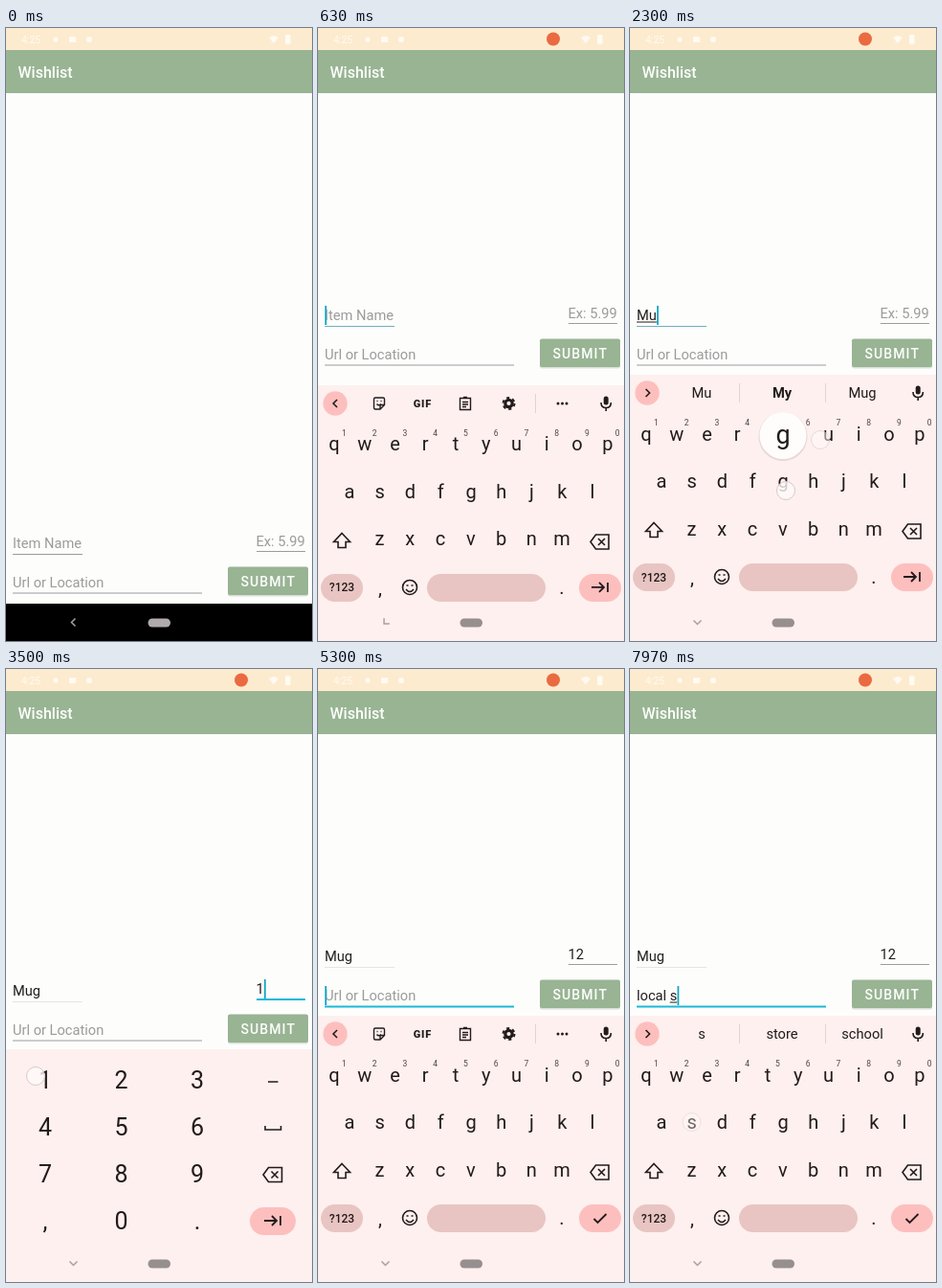
Recreate the animation shown at these times as an HTML page. Size 320 px wide and 640 px high, loop 8 s.

```html
<!DOCTYPE html>
<html lang="en">
<head>
<meta charset="utf-8">
<title>Wishlist</title>
<style>
  html, body { margin: 0; width: 100%; height: 100%; overflow: hidden; background: #fdfdfc; }
  svg { display: block; width: 320px; height: 640px; font-family: Roboto, sans-serif; stroke-width: 1.6; }
  .ink { fill: #221b1b; }
  .line { fill: none; stroke: #221b1b; }
  .mid { text-anchor: middle; }
  .field { font-size: 14.65px; }
  .key { font-size: 20px; }
  .digit { font-size: 25px; }
  .hint { font-size: 8.5px; fill: #4e4444; }
  .word { font-size: 14.7px; }
  .board { fill: #fdf0ee; }
  .sage { fill: #98b493; }
  .pink { fill: #fdbfbe; }
  .tan { fill: #e8c5c2; }
  .rule { stroke: #e3d3d0; stroke-width: 1; }
</style>
</head>
<body>
<svg viewBox="0 0 320 640">
  <rect width="320" height="640" fill="#fdfdfc"/>
  <rect width="320" height="23" fill="#fdebcf"/>
  <g fill="#fffaf2">
    <text x="16" y="16" font-size="10.5">4:25</text>
    <circle cx="52" cy="12" r="2.5"/>
    <rect x="66" y="9" width="7" height="6" rx="1"/>
    <circle cx="87" cy="12" r="3"/>
    <path d="M275 10q5-4 10 0l-5 6z"/>
    <rect x="292" y="7" width="5.5" height="10" rx="1"/>
  </g>
  <circle id="rec" cx="246" cy="11.5" r="7" fill="#ea6a41"/>
  <rect y="23" width="320" height="45" class="sage"/>
  <text x="12.5" y="52" font-size="16" font-weight="500" fill="#fdfdfc">Wishlist</text>

  <g id="form">
    <g class="field">
      <text id="itemText" x="7" y="305"/>
      <text id="priceText" x="261.5" y="303"/>
      <text id="urlText" x="7" y="346"/>
    </g>
    <rect id="itemRule" x="7" y="311" width="73"/>
    <rect id="priceRule" x="262" y="308" width="51"/>
    <rect id="urlRule" x="7" y="351.500" width="198"/>
    <rect id="comp" height="1" class="ink"/>
    <rect id="caret" width="1.8" height="20" fill="#15a9c4"/>
    <rect x="232" y="325.5" width="84" height="30" rx="2" fill="#dcdfda"/>
    <rect x="232" y="324.5" width="84" height="29.5" rx="2" class="sage"/>
    <text x="245.5" y="345" font-size="14" font-weight="500" letter-spacing="1.1" fill="#fdfdfc">SUBMIT</text>
  </g>

  <g id="abc">
    <rect y="362" width="320" height="278" class="board"/>
    <circle cx="18" cy="381" r="12.7" class="pink"/>
    <path id="chevron" class="line"/>
    <g id="tools">
      <path class="line" stroke-width="1.4" d="M60 375h8q1.500 0 1.500 1.500v6l-4.500 4.500h-5q-1.500 0-1.500-1.500v-9q0-1.500 1.500-1.500zM69.500 382.500h-3.500q-1 0-1 1v3.500M61.500 381.500q2 2.500 4.500 0M61.500 378.500h1M65.500 378.500h1"/>
      <text x="109.5" y="385" class="mid ink" font-size="11" font-weight="900" letter-spacing=".9">GIF</text>
      <path class="line" stroke-width="1.4" d="M148.500 375.500h11v12h-11zM151 379.500h6M151 382h6M151 384.500h4M152 374.500h4"/>
      <circle cx="199.500" cy="381" r="3.700" class="line" stroke-width="3.200"/>
      <circle cx="199.500" cy="381" r="6" class="line" stroke-width="2" stroke-dasharray="3.140"/>
      <path class="rule" d="M227.500 371v20"/>
      <g class="ink"><circle cx="251" cy="381" r="1.500"/><circle cx="255.500" cy="381" r="1.500"/><circle cx="260" cy="381" r="1.500"/></g>
    </g>
    <g id="words" class="word mid ink">
      <path class="rule" d="M114.500 371v20M204.500 371v20"/>
      <text x="75" y="386"/><text x="159" y="386"/><text x="243" y="386"/>
      <g id="emoji">
        <path class="rule" d="M243.500 371v20"/>
        <path fill="#e8607c" d="M222 389c-11-4-7-14-1-9 4-7 12 0 1 9z"/>
        <path fill="#f0889a" d="M229 382c-8-3-5-10-1-6 4-5 9 1 1 6z"/>
        <circle cx="263.500" cy="381" r="8" fill="#f7c04a"/>
        <path class="line" stroke-width="1.200" d="M259 379q1.500-2 3 0M266 378.500h2M263 382q3 1 0 2 3 1 0 2"/>
        <path fill="#e5413f" d="M269 389c-6-3-3-7 0-4 3-3 6 1 0 4z"/>
      </g>
    </g>
    <rect x="298.700" y="373.500" width="5" height="9" rx="2.500" class="ink"/>
    <path class="line" d="M296 380q0 5.500 5.200 5.500t5.200-5.500M301.200 385.500v3.500"/>
    <g id="keys"></g>
    <path class="line" d="M25 516.500l8.500 9h-4.500v6h-8v-6h-4.500z"/>
    <path class="line" d="M285 525.500l5.500-7.500h13.500v15h-13.500zM293 522l7 7m0-7l-7 7"/>
    <rect x="3" y="559" width="44" height="29" rx="14.500" class="tan"/>
    <text x="25" y="577.500" class="mid ink" font-size="12" font-weight="500">?123</text>
    <text x="65" y="581" class="mid ink key">,</text>
    <circle cx="96" cy="573" r="7.500" class="line"/>
    <path class="line" d="M92 575q4 5 8 0M92.500 571h2M97.500 571h2"/>
    <rect x="114" y="559" width="124" height="29" rx="14.500" class="tan"/>
    <text x="255" y="580" class="mid ink key">.</text>
    <rect x="273" y="559" width="44" height="29" rx="14.500" class="pink"/>
    <path id="enter" class="line" stroke-width="1.800"/>
  </g>

  <g id="num">
    <rect y="397" width="320" height="243" class="board"/>
    <g id="digits"></g>
    <path class="line" d="M274 431h10.500M271 477v4h16.500v-4"/>
    <path class="line" d="M269 528l5.500-7.500h14v15h-14zM277.500 524.500l7 7m0-7l-7 7"/>
    <rect x="255" y="562" width="48" height="29" rx="14.500" class="pink"/>
    <path class="line" stroke-width="1.800" d="M270 576h13m-5-5l5 5-5 5M287 571v10"/>
  </g>

  <rect id="nav" y="601" width="320" height="39"/>
  <rect id="pill" x="148.500" y="616.500" width="23.500" height="9" rx="4.500"/>
  <path id="back" fill="none" stroke="#a89f9f" stroke-width="1.500" d="M2-4l-4 4 4 4"/>

  <g id="dots" stroke-width="1"></g>
  <g id="popup">
    <circle r="25.500" cy="1" fill="#e6d8d6"/>
    <circle r="24.500" fill="#fffdfc"/>
    <text y="8" class="mid ink" font-size="27"></text>
  </g>
</svg>
<script>
const LOOP = 8000, SHOWN = 530;
const $ = id => document.getElementById(id);
const set = (el, attrs) => { for (const k in attrs) el.setAttribute(k, attrs[k]); };
const show = (el, on) => { el.style.display = on ? '' : 'none'; };
const clamp = v => Math.min(1, Math.max(0, v));

// Key layout: letters, first x, centre y
const PITCH = 31.75;
const rows = [['qwertyuiop', 17, 424], ['asdfghjkl', 33, 473.5], ['zxcvbnm', 64.5, 523]];
const pos = {};
let html = '';
rows.forEach(([letters, x0, y], r) => [...letters].forEach((ch, i) => {
  const x = x0 + i * PITCH;
  pos[ch] = [x, y];
  html += `<text class="mid ink key letter" x="${x}" y="${y + 6.5}">${ch}</text>`;
  if (!r) html += `<text class="mid hint" x="${x + 10.5}" y="${y - 9}">${(i + 1) % 10}</text>`;
}));
$('keys').innerHTML = html;
$('digits').innerHTML = ['123', '456', '789', ',0.'].map((row, r) => [...row].map((ch, c) =>
  `<text class="mid ink digit" x="${41 + c * 79.5}" y="${438 + r * 49}">${ch}</text>`).join('')).join('');
const letters = [...document.querySelectorAll('.letter')];
const words = [...document.querySelectorAll('#words text')];

const fields = {
  item: { x: 7, y: 305, hint: 'Item Name' },
  price: { x: 261.5, y: 303, hint: 'Ex: 5.99' },
  url: { x: 7, y: 346, hint: 'Url or Location' }
};

// Taps: time, x, y, letter shown in the popup
const taps = [
  [260, 40, 538], [1150, 25, 524], [1640, 254, 526, 'm'], [2110, 199, 430, 'u'],
  [2270, 163, 483, 'g'], [2850, 294, 574], [3390, 31, 425], [3760, 118, 431],
  [4100, 278, 577], [6000, 286, 475, 'l'], [6210, 270, 427, 'o'], [6410, 127, 524, 'c'],
  [6800, 33, 475, 'a'], [7100, 287, 474, 'l'], [7450, 176, 564], [7750, 64.5, 473, 's']
];
$('dots').innerHTML = taps.map(([, x, y]) =>
  `<circle cx="${x}" cy="${y}" r="9.5" fill="#fffafa" fill-opacity=".8" stroke="#d8caca"/>`).join('');
const dots = [...$('dots').children];

// State changes; comp is where the underlined word begins, * marks bold
const steps = [
  [0, { item: '', price: '', url: '', comp: -1, words: null, focus: '', upper: false, pad: 'none', check: false }],
  [360, { focus: 'item' }],
  [SHOWN, { pad: 'abc' }],
  [1250, { upper: true }],
  [1740, { item: 'M', comp: 0, upper: false, words: ['M', '*My', 'Me'] }],
  [2210, { item: 'Mu', words: ['Mu', '*My', 'Mug'] }],
  [2370, { item: 'Mug', words: ['Mug', '*Mugs', 'Must'] }],
  [2960, { focus: 'price', comp: -1, pad: 'num' }],
  [3490, { price: '1' }],
  [3860, { price: '12' }],
  [4200, { focus: 'url', pad: 'abc', check: true, words: null }],
  [6100, { url: 'l', comp: 0, words: ['l', '*I', 'love'] }],
  [6310, { url: 'lo', words: ['lo', '*love', 'look'] }],
  [6510, { url: 'loc', words: ['loc', '*love', ''] }],
  [6900, { url: 'loca', words: ['loca', '*local', 'location'] }],
  [7200, { url: 'local', words: ['locally', '*local', 'locals'] }],
  [7550, { url: 'local ', comp: -1, words: ['and', 'shop', 'store'] }],
  [7850, { url: 'local s', comp: 6, words: ['s', 'store', 'school'] }]
];

function stateAt(t) {
  const s = {};
  for (const [at, change] of steps) if (at <= t) Object.assign(s, change, { since: at });
  return s;
}

function drawForm(s, t) {
  const dy = { none: 238, abc: 0, num: 36 }[s.pad];
  set($('form'), { transform: `translate(0 ${dy})` });
  for (const name in fields) {
    const text = $(name + 'Text'), on = s.focus === name;
    text.textContent = s[name] || fields[name].hint;
    set(text, { fill: s[name] ? '#221f1f' : '#9b9b9c', 'xml:space': 'preserve' });
    const filled = name === 'item' && s.item && !on;
    const thick = on && name !== 'item';
    set($(name + 'Rule'), {
      height: thick ? 2 : 1,
      fill: on ? (thick ? '#1cb9d6' : '#6fb0bd') : filled ? '#e4e4ea' : '#9b9ba2'
    });
  }
  const f = fields[s.focus], value = s[s.focus] || '', text = f && $(s.focus + 'Text');
  const until = n => n ? text.getSubStringLength(0, n) : 0;
  show($('caret'), f && (t - s.since) % 1000 < 500);
  show($('comp'), f && s.comp >= 0);
  if (!f) return;
  set($('caret'), { x: f.x + until(value.length) + .2, y: f.y - 15 });
  if (s.comp >= 0) {
    const from = until(s.comp);
    set($('comp'), { x: f.x + from, y: f.y + 1.5, width: until(value.length) - from });
  }
}

function drawKeyboard(s, t) {
  show($('abc'), s.pad === 'abc');
  show($('num'), s.pad === 'num');
  const rise = 28 * (1 - clamp((t - SHOWN) / 270)) ** 2;
  set($('abc'), { transform: `translate(0 ${rise})` });
  letters.forEach(k => {
    const ch = k.textContent;
    k.textContent = s.upper ? ch.toUpperCase() : ch.toLowerCase();
  });
  show($('tools'), !s.words);
  show($('words'), s.words);
  set($('chevron'), { d: s.words ? 'M16.500 377l4 4-4 4' : 'M20 377l-4 4 4 4' });
  if (s.words) words.forEach((w, i) => {
    w.textContent = s.words[i].replace('*', '');
    set(w, { 'font-weight': s.words[i][0] === '*' ? 700 : 400 });
  });
  show($('emoji'), s.words && !s.words[2]);
  set($('enter'), { d: s.check ? 'M288.500 574l4 4 9-9' : 'M286 573h13m-5-5l5 5-5 5M303 568v10' });
}

function drawSystem(s, t) {
  const open = s.pad !== 'none';
  show($('rec'), t >= 30);
  set($('nav'), { fill: open ? '#fdf0ee' : '#000' });
  set($('pill'), { fill: open ? '#978e90' : '#b0aaaa' });
  const turn = clamp((t - SHOWN) / 200);
  set($('back'), { transform: `translate(70.500 620.500) rotate(${-90 * turn})` });
}

function drawTaps(t) {
  let up = null;
  taps.forEach(([at, , , ch], i) => {
    const age = t - at;
    dots[i].style.opacity = age < 0 ? 0 : 1 - clamp((age - 130) / 160);
    if (ch && age >= 0 && age < 125) up = ch;
  });
  show($('popup'), up);
  if (!up) return;
  const [x, y] = pos[up];
  set($('popup'), { transform: `translate(${x} ${y - 48})` });
  $('popup').lastElementChild.textContent = up === 'm' ? 'M' : up;
}

const start = performance.now();
function frame() {
  const t = (performance.now() - start) % LOOP, s = stateAt(t);
  drawForm(s, t);
  drawKeyboard(s, t);
  drawSystem(s, t);
  drawTaps(t);
  requestAnimationFrame(frame);
}
frame();
</script>
</body>
</html>
```
